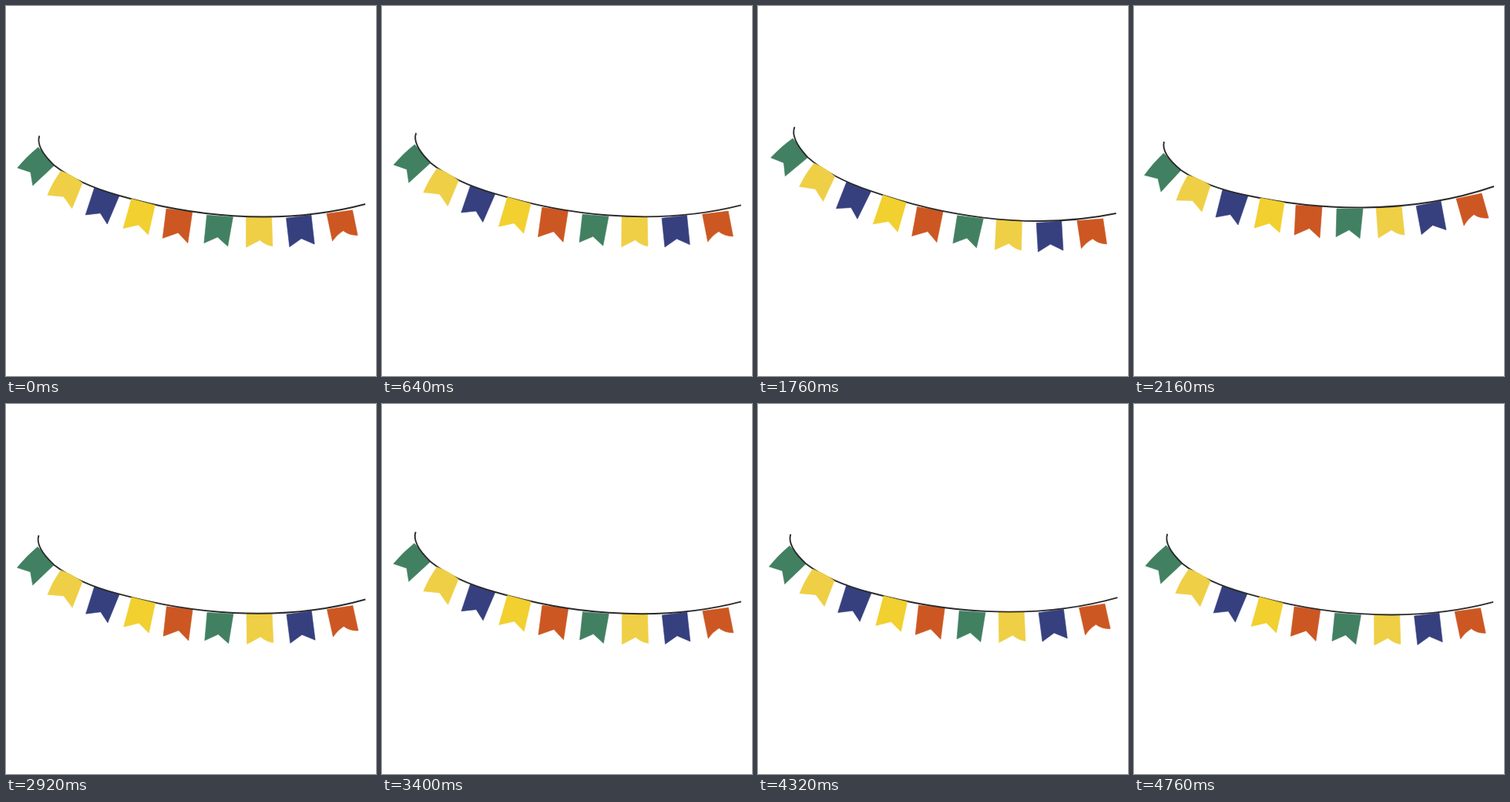
Write an HTML page that moves like this. It is 480 px wide and 480 px high and loops after 4.8 s.

```html
<!DOCTYPE html>
<html lang="en">
<head>
<meta charset="utf-8">
<title>Bunting</title>
<style>
  html, body { margin: 0; width: 100%; height: 100%; overflow: hidden; background: #fff; }
  svg { display: block; width: 100vw; height: 100vh; }
</style>
</head>
<body>
<svg viewBox="0 0 480 480">
  <g id="garland">
    <g stroke-width=".6" stroke-linejoin="round">
      <path class="green" d="M38.5 191L61 213L35 241L31 224L13.5 219.500Q25 203.500 38.5 191Z"/>
      <path class="blue" d="M115 238L148 246L135 284L125 270.5L106 274Z"/>
      <path class="orange" d="M210 258.5L244 260L241 301L227.500 288.500L208 297Z"/>
      <path class="green" d="M263 263L297 263L293 301.500L279 290.500L262 299.500Z"/>
      <path class="yellow" d="M314 261L347 259L351 297Q343 297 334 290.500L317 301Z"/>
      <path class="blue" d="M366 259.500L398 253L405 290.500L387.500 284.500L373 296.500Z"/>
      <path class="orange" d="M418 250L451 243L460 275Q449 276 441 270.500Q433 276 428 285Z"/>
    </g>
    <path fill="none" stroke="#2b2b2b" stroke-width="1.9"
      d="M39 176C36 187 44 199 61 213C86 230 118 240 148 246C200 257 250 262 297 261.500C355 261 415 252 467 234"/>
    <g stroke-width=".6" stroke-linejoin="round">
      <path class="yellow" d="M70 219.500Q86 224 99 233L88 267L76 252.500L55 252Q60 236 70 219.500Z"/>
      <path class="gold" d="M164 249L195 255L189 294L175.500 282L156 288Z"/>
    </g>
  </g>
</svg>
<script>
const LOOP = 4800, STEP = 40;
const COLORS = { green: '#428062', yellow: '#efcf45', gold: '#f1d02f', blue: '#36407f', orange: '#cc5722' };
const PIVOT = [252.25, 229], SPAN = 428;

// Turning points of the swing: [step, drop of the right end against the left]
const TURNS = [
  [-6, 58], [6.5, 0], [20, 45], [30, 0], [42.2, 58], [54, 0],
  [66.5, 58], [78.5, 0], [90.5, 58], [102.5, 0], [114.8, 58], [123.5, 0]
];

for (const [name, color] of Object.entries(COLORS)) {
  document.querySelectorAll('.' + name).forEach(flag => {
    flag.setAttribute('fill', color);
    flag.setAttribute('stroke', color);
  });
}

function pose(step) {
  const i = TURNS.findIndex(turn => turn[0] > step);
  const [t0, a] = TURNS[i - 1], [t1, b] = TURNS[i];
  const angle = Math.PI * (step - t0) / (t1 - t0);
  const tilt = a + (b - a) * (1 - Math.cos(angle)) / 2;
  // The garland hangs a little lower while it falls back
  const lag = 0.9 * Math.sin(angle) * Math.sign(a - b);
  const sink = 7.5 * (1 - (1 - tilt / 46) ** 2) + lag;
  return { turn: tilt / SPAN * 180 / Math.PI, sink };
}

const garland = document.getElementById('garland');
const start = performance.now();

function draw(now) {
  const time = Math.max(0, now - start) % LOOP;
  const { turn, sink } = pose(Math.floor(time / STEP));
  garland.setAttribute('transform', `translate(0 ${sink}) rotate(${turn} ${PIVOT})`);
  requestAnimationFrame(draw);
}
draw(start);
</script>
</body>
</html>
```
